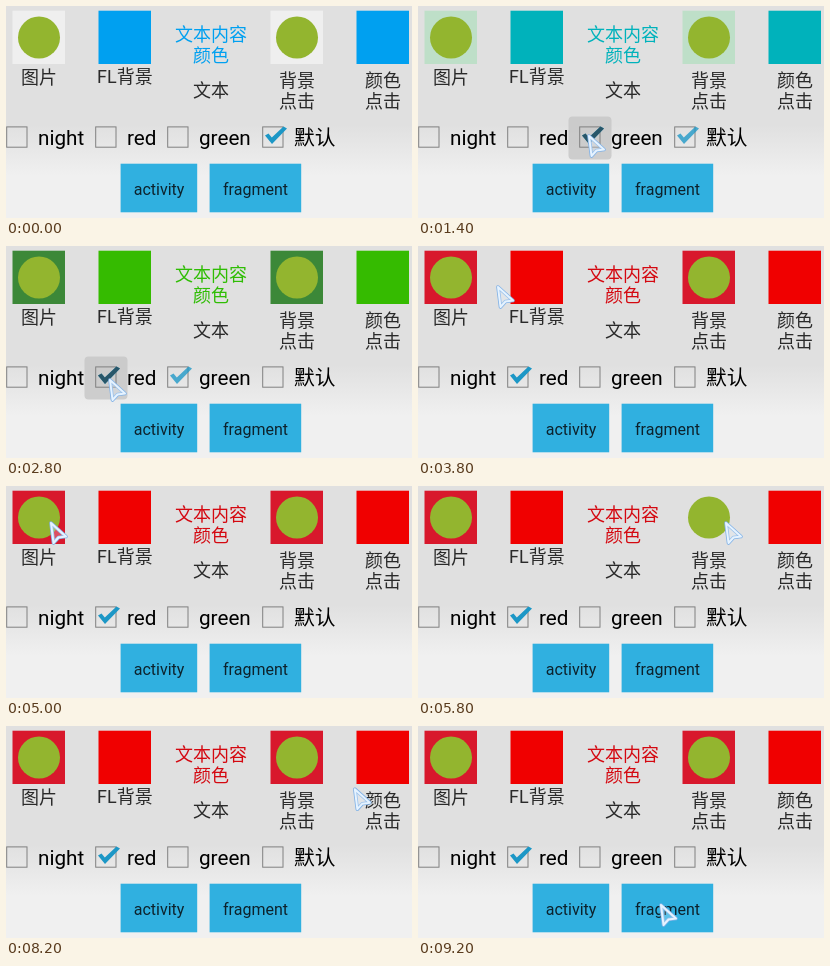
An HTML page that plays this animation: 406 by 212 pixels, repeating every 9400 ms.

```html
<!DOCTYPE html>
<html lang="zh">
<head>
<meta charset="utf-8">
<style>
  html, body { margin: 0; width: 100%; height: 100%; overflow: hidden; background: #e0e0e0; }
  svg { display: block; width: 406px; height: 212px; }
  text { font: 18px Roboto, "Noto Sans CJK SC", "Noto Sans CJK", sans-serif; fill: #2a2a2a; }
  .option text { font-size: 20.7px; fill: #000; }
  .button text { font-size: 16px; fill: #0d222c; text-anchor: middle; }
  .button rect { fill: #30b0e0; }
  #caption text { fill: inherit; }
  .logo { fill: #93b52f; }
  .box { fill: none; stroke: #808080; }
  .check { fill: #1c97c6; }
  .dark { fill: #2c444e; }
  .halo { fill: #c6c6c6; }
  #cursor { fill: none; stroke-linejoin: round; }
</style>
</head>
<body>
<svg viewBox="0 0 406 212">
  <defs>
    <linearGradient id="shade" x1="0" y1="0" x2="0" y2="1">
      <stop offset=".56" stop-color="#e0e0e0"/>
      <stop offset=".8" stop-color="#f0f0f0"/>
    </linearGradient>
    <path id="arrow" d="M1 1L16 14.500L8.500 15.500L3.500 21Z"/>
  </defs>
  <rect width="406" height="212" fill="url(#shade)"/>

  <rect id="picture" x="6.500" y="4.700" width="52.500" height="53.300"/>
  <circle class="logo" cx="33" cy="31.500" r="21"/>
  <rect id="frame" x="92.500" y="4.700" width="52.500" height="53.300"/>
  <rect id="background" x="264.500" y="4.700" width="52.500" height="53.300"/>
  <circle class="logo" cx="291" cy="31.500" r="21"/>
  <rect id="swatch" x="350.500" y="4.700" width="52.500" height="53.300"/>

  <text x="15" y="78">图片</text>
  <text x="91" y="77">FL背景</text>
  <g id="caption">
    <text x="169" y="35">文本内容</text>
    <text x="187" y="56">颜色</text>
  </g>
  <text x="187" y="91">文本</text>
  <text x="273" y="81">背景</text>
  <text x="273" y="102">点击</text>
  <text x="359" y="81">颜色</text>
  <text x="359" y="102">点击</text>

  <g id="options"></g>

  <g class="button">
    <rect x="114.600" y="157.700" width="76.600" height="48.600"/>
    <text x="153" y="189">activity</text>
    <rect x="203.600" y="157.700" width="91.600" height="48.600"/>
    <text x="249.500" y="189">fragment</text>
  </g>

  <g id="cursor">
    <use href="#arrow" stroke="#82b2e6" stroke-width="3.600"/>
    <use href="#arrow" stroke="#e6f3ff" stroke-width="2" fill="#e6f3ff" fill-opacity=".25"/>
  </g>
</svg>
<script>
  const LOOP = 9400, STEP = 200;
  const GREEN_TAP = 1400, RED_TAP = 2800;
  const colors = [[0, 160, 240], [0, 240, 0], [240, 0, 0]];
  const captionColors = [[0, 160, 240], [0, 240, 0], [212, 8, 16]];
  const pictureColors = [[239, 239, 239], [16, 168, 60], [216, 24, 44]];

  // time, x, y of the pointer tip
  const path = [
    [200, 353, 165], [1000, 170, 129], [1400, 170, 129],
    [2400, 103, 133], [2800, 103, 133], [3800, 79, 40],
    [4400, 44, 36], [5200, 44, 36], [5800, 307, 36],
    [6400, 307, 36], [6600, 314, 37], [6800, 314, 37],
    [7200, 369, 39], [8000, 369, 39], [9200, 242, 178]
  ];

  const $ = id => document.getElementById(id);
  const clamp = v => Math.max(0, Math.min(1, v));
  const mix = (a, b, p) => a + (b - a) * p;
  const between = (t, from, to) => t >= from && t < to;

  const options = [["night", 1], ["red", 90], ["green", 162], ["默认", 257]].map(([label, x]) => {
    const mark = "M2 8.500L5.500 6.500L8.800 10.500L20.500 -.5L24 1.500L9 17Z";
    $("options").insertAdjacentHTML("beforeend", `
      <g class="option" transform="translate(${x} 121)">
        <rect class="halo" x="-11.500" y="-10.500" width="43" height="43" rx="4" opacity="0"/>
        <rect class="box" x="-.3" y="-.1" width="20.300" height="20.300"/>
        <path class="check" d="${mark}" opacity="0"/>
        <path class="check dark" d="${mark}" opacity="0"/>
        <text x="31" y="17.500">${label}</text>
      </g>`);
    const group = $("options").lastElementChild;
    const [halo, check, dark] = [".halo", ".check", ".dark"].map(s => group.querySelector(s));
    return (checked, pressed) => {
      check.setAttribute("opacity", checked);
      halo.setAttribute("opacity", pressed);
      dark.setAttribute("opacity", pressed);
    };
  });

  const fade = (t, tap) => t < tap ? 0 : clamp(0.22 + (t - tap) / 600);

  function blend(palette, toGreen, toRed) {
    const rgb = palette[0].map((c, i) =>
      Math.round(mix(mix(c, palette[1][i], toGreen), palette[2][i], toRed)));
    return `rgb(${rgb})`;
  }

  function pointer(t) {
    const i = path.findIndex(([time]) => time >= t);
    if (i <= 0) return path[0].slice(1);
    const [t0, x0, y0] = path[i - 1], [t1, x1, y1] = path[i];
    const p = (t - t0) / (t1 - t0);
    return [mix(x0, x1, p), mix(y0, y1, p)];
  }

  function draw(t) {
    const toGreen = fade(t, GREEN_TAP), toRed = fade(t, RED_TAP);
    const color = blend(colors, toGreen, toRed);
    const pictureColor = blend(pictureColors, toGreen, toRed);

    $("frame").setAttribute("fill", color);
    $("caption").setAttribute("fill", blend(captionColors, toGreen, toRed));
    $("picture").setAttribute("fill", between(t, 4400, 5000) ? "none" : pictureColor);
    $("background").setAttribute("fill", between(t, 5800, 6600) ? "none" : pictureColor);
    $("swatch").setAttribute("fill", between(t, 7200, 7800) ? "rgb(0,80,80)" : color);

    const greenOn = t >= GREEN_TAP, redOn = t >= RED_TAP;
    options[1](+redOn, redOn ? 1 - toRed : 0);
    options[2](greenOn ? 1 - toRed : 0, greenOn ? 1 - toGreen : 0);
    options[3](1 - toGreen, 0);

    $("cursor").setAttribute("visibility", t < path[0][0] ? "hidden" : "visible");
    $("cursor").setAttribute("transform", `translate(${pointer(t)})`);
  }

  function tick() {
    const t = performance.now() % LOOP;
    draw(Math.floor(t / STEP) * STEP);
    requestAnimationFrame(tick);
  }
  tick();
</script>
</body>
</html>
```
